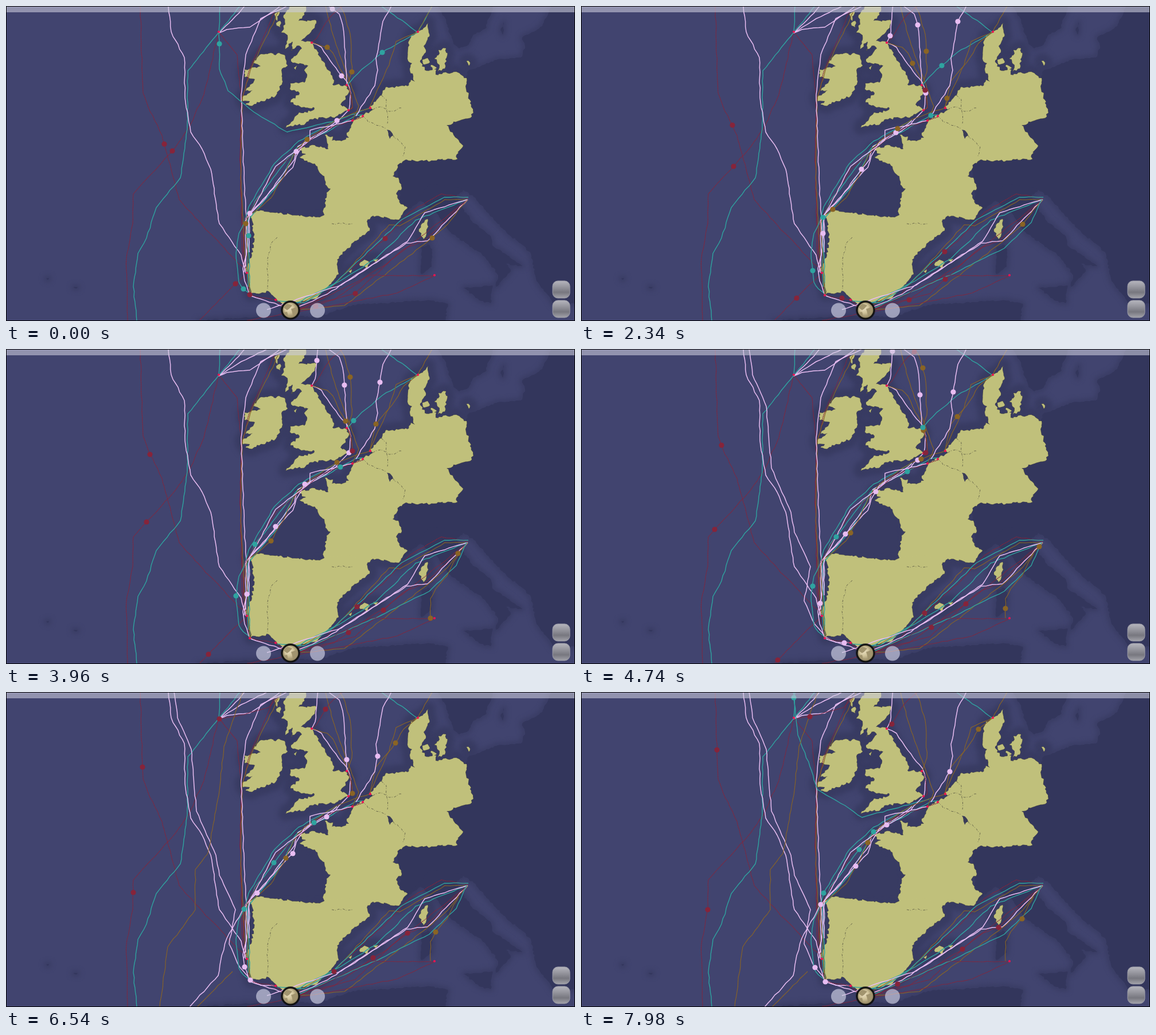
An HTML page with a canvas that plays this animation: 992x550 px, repeating every 8000 ms.

```html
<!DOCTYPE html>
<html lang="en">
<head>
<meta charset="utf-8">
<title>Shipping routes</title>
<style>
html, body { margin: 0; width: 100%; height: 100%; overflow: hidden; background: #41446f; }
canvas { display: block; width: 992px; height: 550px; }
</style>
</head>
<body>
<canvas id="map" width="992" height="550"></canvas>
<script>
const W = 992, H = 550, LOOP = 8000;
const PINK = '#e8bdf2', TEAL = '#2fa3a0', BROWN = '#8a6424', RED = '#86243a';
const ctx = document.getElementById('map').getContext('2d');

let seed = 7;
const rand = () => (seed = (seed * 16807) % 2147483647) / 2147483647;
const parse = s => s.trim().split(/\s+/).map(p => p.split(',').map(parseFloat));

// Breaks straight edges into short, ragged pieces
function ragged(pts, rough, step, closed) {
  const path = new Path2D();
  pts.forEach(([x, y], i) => {
    const [u, v] = pts[i + 1] || (closed ? pts[0] : pts[i]);
    const n = Math.max(1, Math.round(Math.hypot(u - x, v - y) / step));
    for (let k = 0; k < n; k++) {
      const r = k ? rough * 2 : 0;
      path.lineTo(x + (u - x) * k / n + (rand() - .5) * r, y + (v - y) * k / n + (rand() - .5) * r);
    }
  });
  if (closed) path.closePath();
  return path;
}
const coast = (s, rough = 1.8) => ragged(parse(s), rough, 3.5, true);

const lands = [], dimLands = [], rivers = [];
const land = s => lands.push(coast(s));
const dim = s => dimLands.push(coast(s, 1.4));
const river = s => rivers.push(ragged(parse(s), 1.5, 5));

// Britain
land(`497,0 522,0 523,9 510,26 541,26 538,38 514,61 530,62 541,76 550,95 566,115 572,130 569,137 592,139
  598,150 583,172 597,181 575,193 529,198 522,205 488,212 511,186 531,184 538,178 515,177 496,168 512,152
  495,145 496,135 520,134 525,119 520,112 527,104 500,99 497,93 516,74 511,69 498,78 499,62 487,75
  491,51 480,46 487,32 484,16`);
// Ireland
land(`462,82 470,86 476,82 486,86 491,104 480,112 481,135 470,157 425,174 418,172 425,166 413,166 412,158
  430,147 418,148 434,128 416,124 416,111 444,105 431,99 445,84`);
// Denmark, Germany, Low Countries
land(`736,30 738,53 728,70 732,77 722,95 730,112 750,111 749,120 785,115 803,126 801,140 814,183 812,193
  768,208 780,225 797,244 785,260 787,267 715,271 698,268 670,285 610,220 606,199 640,181 635,175 655,156
  662,142 700,140 706,129 713,132 704,110 708,100 700,92 702,62 706,52 732,36`);
// France
land(`606,200 594,224 598,230 585,236 568,235 570,228 556,225 562,250 538,243 510,250 523,259 512,264
  543,280 547,291 555,297 557,312 566,319 559,326 553,367 560,390 628,390 629,376 640,366 685,373
  700,352 688,346 680,328 690,318 684,300 674,297 690,265 660,220 630,195`);
// Iberia
land(`553,366 540,369 495,364 441,358 423,366 429,374 433,400 429,435 417,462 422,468 427,503 458,498
  477,516 485,522 498,520 543,509 553,497 571,479 580,468 577,443 605,413 634,392 628,374 600,360`);
// Islands
land('747,92 756,83 754,77 767,74 768,90 765,109 753,114 756,103');
land('726,94 735,91 739,98 728,102');
land('803,96 809,99 807,104');
land('735,372 736,385 728,407 720,390 729,378');
land('616,451 625,443 634,449 628,458');
land('640,444 649,442 645,447');
land('597,463 603,460 601,466');
land('468,14 476,9 473,26');
land('471,30 478,26 478,37');
land('741,103 751,108 744,112');
land('502,108 507,104 505,111');

// Central and eastern Europe
dim(`800,130 806,113 855,94 900,88 905,70 900,55 935,35 950,0 992,0 992,520 955,520 925,480 914,430
  865,388 815,333 795,320 740,320 690,365 680,260 770,190`);
// Italy with its islands
dim(`690,365 722,340 752,363 775,395 835,438 858,470 854,490 880,463 872,450 900,454 848,418 845,402
  812,375 790,345 786,330 800,318 740,310`);
dim('798,492 848,488 845,519 825,514');
dim('724,422 735,416 743,425 742,455 724,468');
// North Africa
dim('335,550 400,545 480,541 545,543 605,522 650,519 740,514 770,520 766,550');
// Southern Scandinavia
dim('752,0 765,20 780,66 790,74 806,68 815,50 835,40 850,0');
dim('862,42 868,28 866,50');
dim('70,476 75,475 73,478');
dim('118,491 125,491 123,493');

river('473,404 464,412 456,442 456,494');
river('640,181 654,176 668,184 690,178');
river('655,156 663,163 665,205');
river('675,226 696,246 692,262');
river('622,192 631,202 664,214');
river('568,380 605,380');

const base = document.createElement('canvas');
base.width = W; base.height = H;

function drawBase() {
  const c = base.getContext('2d');
  c.fillStyle = '#41446f';
  c.fillRect(0, 0, W, H);
  c.lineJoin = 'round';
  c.filter = 'blur(4px)';
  c.strokeStyle = c.fillStyle = '#383b62';
  c.lineWidth = 26;
  lands.forEach(p => c.stroke(p));
  c.lineWidth = 8;
  dimLands.forEach(p => c.stroke(p));
  c.fill(coast('505,262 560,295 560,365 430,365'));
  c.filter = 'none';
  c.fillStyle = '#33365c';
  dimLands.forEach(p => c.fill(p));
  c.fillStyle = '#c0c07b';
  c.strokeStyle = '#565540';
  c.lineWidth = 1;
  lands.forEach(p => c.stroke(p));
  lands.forEach(p => c.fill(p));
  c.fillStyle = '#3a3c57';
  c.fill(coast('664,216 669,217 675,226 669,232', 1));
  c.strokeStyle = '#6c6b4c';
  c.setLineDash([4, 2, 1, 3]);
  rivers.forEach(p => c.stroke(p));
}

// Letters a to g on a point mean the ship passes it at that key time, "@" gives a time in ms
const KEYS = { a: 540, b: 1320, c: 2340, d: 3960, e: 5520, f: 6540, g: 7980 };
const routes = [];
function route(color, s, from = 0, to = LOOP) {
  const pts = parse(s), stops = [];
  let len = 0;
  s.split(' ').forEach((p, i) => {
    if (i) len += Math.hypot(pts[i][0] - pts[i - 1][0], pts[i][1] - pts[i - 1][1]);
    pts[i].push(len);
    const at = p.split('@')[1] || KEYS[p.slice(-1)];
    if (at) stops.push([+at, len]);
  });
  routes.push({ color, pts, stops, from, to, path: ragged(pts, .8, 9) });
}

// Open Atlantic
route(RED, '418,462 330,370 302,338 276,241a 272,226b 264,208c 251,184d 239,152e 237,101g 234,0');
route(RED, '371,46 358,100 345,155 318,215 290,253a 266,280c 245,302d 222,328e 221,380g 210,440 212,550');
route(RED, '371,46 403,85 410,165 409,280 414,430 419,466');
route(RED, '468,11 424,112 411,168 408,260 412,440 425,505');
route(BROWN, '480,0 426,112 412,160 409,300 417,440 427,505');
route(PINK, '490,0 444,22 418,85 410,155 415,300 421,420 415,465');
route(PINK, '416,0 400,18 371,47 385,41 425,37 478,0');
route(PINK, '371,47 410,22 455,0', 1700);
route(RED, '371,47@6480 399,43g 458,27 474,8', 6300);
route(TEAL, '408,0 371,46 317,113 316,215 304,300 262,352 245,405 230,432 222,490 228,550');
route(TEAL, '373,0 371,46');
route(TEAL, '635,178 577,200 490,220 432,185 387,148 372,110 372,66a 371,52b 371,46@1620', 0, 1700);
route(TEAL, '371,-6@7140 371,10g 378,75 399,130 412,170 460,198 490,219 607,187', 7140);
route(PINK, '283,0 288,45 311,90 312,160 322,220 342,250 357,285 372,380 410,435 418,466');
route(PINK, '470,513@4200 444,512e 426,503f 408,481g 389,440 400,380 372,320 366,285 332,208 323,100 299,45 293,0', 4200);
route(PINK, '320,550 370,495 376,460 385,430 418,371', 6000);
route(BROWN, '413,0 380,95 371,180 352,282 330,310 330,380 282,445 268,550', 6000);
route(BROWN, '333,550 395,488', 5200);
route(RED, '414,472 400,485a 390,495b 353,533d 338,548@5160', 0, 5200);

// Coast of Iberia, Biscay and Channel
route(TEAL, '430,508 414,494a 406,482b 404,462c 401,431d 406,397e 415,379f 423,351g 468,275 510,236 577,199');
route(TEAL, '425,500 423,401a 425,387b 422,369c 434,341d 455,315e 485,275g 510,244');
route(TEAL, '622,190@1680 610,191c 583,206d 555,222e 537,228f 510,244g 468,320 421,375 422,490');
route(PINK, '533,64 550,72 565,95 585,122a 595,133b 601,152c 598,181d 575,206e 559,218f 533,232g 508,246');
route(PINK, '577,200a 549,221c 521,236d 506,262e 500,282f 479,304g 418,371');
route(PINK, '506,254a 503,268b 489,285c 470,310d 452,336e 418,371g 418,455');
route(PINK, '425,362a 423,376b 422,397c 420,428d 413,459e 416,480f 426,506g');
route(BROWN, '425,505 418,380a 424,366b 439,355c 462,335d 478,307e 488,290f 500,263g 508,248');
route(BROWN, '508,248 525,233a 552,214c 577,198d 608,186e 635,178@6480');
route(RED, '622,194 550,218 470,285 417,373 414,430');
route(PINK, '604,200 530,217 530,234 470,280 424,367 424,430');

// North Sea
route(BROWN, '533,64 560,72a 570,82b 578,100c 592,126d 602,157e 604,177f 598,182@6720', 0, 6700);
route(BROWN, '557,0 570,50 595,120 615,175 604,200');
route(BROWN, '595,138 603,115a 602,79c 600,49d 591,17e 580,-5@6420');
route(PINK, '562,0 569,5a 581,14b 587,33c 590,63d 592,97e 595,138@7500', 0, 7500);
route(RED, '588,0@4260 570,14e 557,30f 542,56g 533,64');
route(PINK, '533,64@1560 539,52c 542,20d 544,-6@5220', 1500);
route(RED, '595,138@1740 600,147c 604,178d 597,183e');
route(TEAL, '718,46 656,81a 645,90b 629,104c 606,125d 595,138@4800', 0, 4800);
route(TEAL, '654,0 718,46');
route(TEAL, '743,0 718,46', 0, 1700);
route(BROWN, '743,0 718,45 680,62 668,103 633,178');
route(BROWN, '635,178@1440 638,161c 645,131d 667,105e 679,89f 693,65g 718,45', 1440);
route(PINK, '675,-6a 667,10b 657,27c 652,58d 645,91e 648,112f 643,139g 610,192');

// Mediterranean
route(RED, '805,336 759,328 704,360 661,406a 650,415b 634,429c 612,450d 586,472e 552,510g 488,533');
route(RED, '490,533 609,502a 635,477c 658,456d 683,433e 700,421f 728,411g 805,338');
route(RED, '490,533 540,524a 552,519b 572,513c 597,495d 624,476e 640,464f 665,449g 805,338');
route(BROWN, '803,338 765,338 686,384 668,382 574,485 505,523');
route(TEAL, '806,334 764,334 690,373 572,485 500,522');
route(TEAL, '803,338 714,374 644,442 520,518 472,515');
route(PINK, '805,338 730,361 700,411 560,503 500,530 427,506');
route(PINK, '805,338 735,410 698,414 585,487 455,530');
route(BROWN, '505,531 590,523 680,454 743,405a 754,395b 770,381c 788,357d 805,338@5160');
route(TEAL, '803,338 785,378 738,423 654,465 505,530', 1700);
route(BROWN, '740,470@3900 740,470d 740,436e 749,419f 769,396g 789,357', 3900);
route(RED, '747,471 635,470 505,534');
route(RED, '747,471 682,501 596,518 420,549');
route(RED, '425,504a 437,508b 455,510c 470,513@3180 490,533');

const ports = parse('371,45 533,64 594,138 597,182 604,200 622,192 635,178 718,45 425,505 420,466 470,513 747,470');

function disc(x, y, r, fill) {
  ctx.beginPath();
  ctx.arc(x, y, r, 0, 7);
  ctx.fillStyle = fill;
  ctx.fill();
}
// Index of the row whose span in the given column holds the value
function span(rows, col, value) {
  let i = 0;
  while (i < rows.length - 2 && value > rows[i + 1][col]) i++;
  return i;
}
function ship({ color, pts, stops }, t) {
  if (!stops.length || t < stops[0][0] || t > stops[stops.length - 1][0]) return;
  const i = span(stops, 0, t), [a, from] = stops[i], [b, to] = stops[i + 1];
  const d = from + (to - from) * (t - a) / (b - a);
  const j = span(pts, 2, d), [x, y, p] = pts[j], [u, v, q] = pts[j + 1];
  const k = q > p ? (d - p) / (q - p) : 0;
  disc(Math.round(x + (u - x) * k), Math.round(y + (v - y) * k), 4.6, color);
}

const globeLand = coast('484,526 490,520 499,523 490,531', .6);
globeLand.addPath(coast('497,529 505,526 508,531 501,542', .6));
globeLand.addPath(coast('485,535 490,534 491,541', .6));

function controls() {
  disc(449, 531.5, 13, 'rgba(204,205,225,.68)');
  disc(543, 531.5, 13, 'rgba(204,205,225,.68)');
  disc(496, 531, 17, 'rgba(20,20,24,.7)');
  disc(496, 531, 16, '#111');
  const g = ctx.createRadialGradient(491, 525, 2, 496, 531, 14);
  ['#eee3c5', '#cfc299', '#8d805b'].forEach((s, i) => g.addColorStop(i / 2, s));
  disc(496, 531, 13.5, g);
  ctx.fillStyle = '#a1946e';
  ctx.fill(globeLand);
  for (const y of [480, 514]) {
    const shade = ctx.createLinearGradient(0, y, 0, y + 30);
    ['#b5b5bd', '#97979f', '#77777f', '#a3a3aa'].forEach((s, i) => shade.addColorStop(i / 3, s));
    ctx.beginPath();
    ctx.roundRect(953, y, 30, 30, 9);
    ctx.fillStyle = shade;
    ctx.fill();
    ctx.strokeStyle = '#9b9ba7';
    ctx.lineWidth = 1;
    ctx.stroke();
  }
}

function draw(t) {
  ctx.drawImage(base, 0, 0);
  ctx.lineJoin = 'round';
  for (const r of routes) {
    if (t < r.from && r.from || t >= r.to) continue;
    ctx.strokeStyle = r.color;
    ctx.lineWidth = r.color === PINK ? 1.5 : r.color === TEAL ? 1.4 : 1.1;
    ctx.setLineDash(r.color === RED ? [2.5, .7] : []);
    ctx.stroke(r.path);
  }
  ctx.setLineDash([]);
  ports.forEach(([x, y]) => disc(x, y, 2.1, '#f01452'));
  routes.forEach(r => ship(r, t));
  ctx.fillStyle = 'rgba(205,206,222,.58)';
  ctx.fillRect(0, 0, W, 11);
  controls();
  ctx.strokeStyle = '#000';
  ctx.lineWidth = 1;
  ctx.strokeRect(.5, .5, W - 1, H - 1);
}

// The picture rests at the start and once more briefly, else moves every 60 ms
function tick(t) {
  if (t < 600) return 540;
  const s = 600 + Math.floor((t - 600) / 60) * 60;
  return s > 1500 && s < 1680 ? 1500 : s;
}

drawBase();
const start = performance.now();
let shown = -1;
function frame() {
  const t = tick((performance.now() - start) % LOOP);
  if (t !== shown) draw(shown = t);
  requestAnimationFrame(frame);
}
frame();
</script>
</body>
</html>
```
